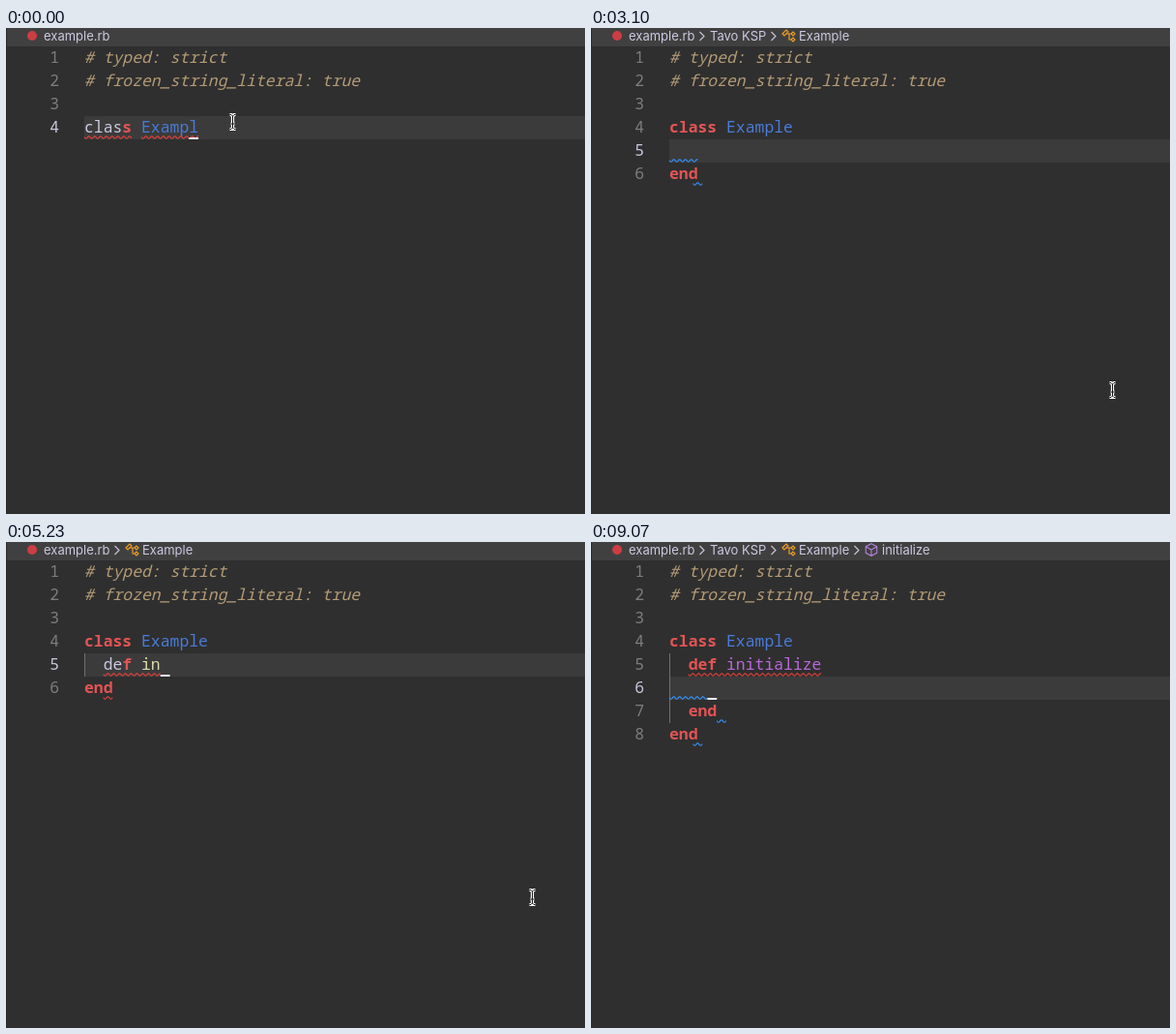
Animation of 599x502 px, one loop 9090 ms. Source, as an HTML page with a canvas:

```html
<!DOCTYPE html>
<html lang="en">
<head>
<meta charset="utf-8">
<title>Editor</title>
<style>
html, body { margin: 0; width: 100%; height: 100%; overflow: hidden; background: #2f2f2f; }
canvas { display: block; }
</style>
</head>
<body>
<canvas id="stage" width="599" height="502"></canvas>
<script>
const ctx = document.getElementById('stage').getContext('2d');
const LOOP = 9090, LEFT = 81, CHAR = 9.84, ROW = 24;
const MONO = '"Noto Sans Mono", monospace', UI = 'Inter, sans-serif';
const RED = '#e8413c', BLUE = '#3794ff', FG = '#cdc8e0';
const INK = { p: FG, k: '#e25455', t: '#4a7bd8', m: '#dcdcaa', f: '#b868d8', c: '#b39b76' };
const COMMENTS = ['~c# typed: strict', '~c# frozen_string_literal: true', ''];
const PLAIN = '~pclas~ks ~tExampl', CLASS = '~kclass ~tExample';

const ITEMS = [
  ['def', '(marlop) New method'], ['defined?'], ['do'],
  ['define_method'], ['define_method'], ['deprecate_constant'],
  ['define_singleton_method'], ['define_singleton_method'],
  ['display'], ['dup'],
  ['def', 'Define method'], ['def', 'Define singleton method']
];

const rowTop = row => 19 + (row - 1) * ROW;
const colX = col => LEFT + col * CHAR;
const defBody = word => [CLASS, '  ~pde~kf ~m' + word, '~kend'];
const defWaves = end => [[5, 2, end, RED], [6, 2, 3, RED]];

// Typing after "def " on line 5
function typed(word) {
  const col = 6 + word.length;
  return { body: defBody(word), col, waves: defWaves(col) };
}

// [time, changes to the editor state]
const STEPS = [
  [0, { body: [PLAIN], row: 4, col: 11, crumbs: '', popup: null, bulb: false, guide: 0,
        waves: [[4, 0, 5, RED], [4, 6, 12, RED]] }],
  [60, { col: 12 }],
  [120, { popup: { row: 4, col: 12, word: 'Exampl', items: [['Example']] } }],
  [240, { body: [PLAIN + 'e'], col: 13 }],
  [300, { popup: null }],
  [360, { waves: [[4, 0, 5, RED], [4, 6, 13, RED]] }],
  [780, { crumbs: 'C' }],
  [1070, { body: [PLAIN + 'e', '', '~kend'], row: 5, col: 2 }],
  [1130, { waves: [[4, 0, 5, RED], [4, 6, 13, RED], [5, 0, 3, BLUE], [6, 2.5, 3.5, BLUE]] }],
  [1310, { crumbs: 'LC' }],
  [1370, { body: [CLASS, '', '~kend'] }],
  [1430, { waves: [[5, 0, 3, BLUE], [6, 2.5, 3.5, BLUE]] }],
  [4230, { body: [CLASS, '  ~pd', '~kend'], col: 3, guide: 1, popup: suggest('d'),
           waves: [[5, 2, 3, RED], [5, 3, 4, BLUE], [6, 2.5, 3.5, BLUE]] }],
  [4350, { body: [CLASS, '  ~pde', '~kend'], col: 4, popup: suggest('de') }],
  [4470, { body: [CLASS, '  ~pde~kf', '~kend'], col: 5, popup: suggest('def') }],
  [4570, { popup: null, waves: defWaves(5) }],
  [4870, { crumbs: 'C' }],
  [5110, typed('i')],
  [5170, typed('in')],
  [5350, typed('int')],
  [5470, typed('inti')],
  [5710, { crumbs: 'LC' }],
  [5770, { bulb: true }],
  [5890, { body: defBody('int'), col: 9 }],
  [6010, { body: defBody('in'), col: 8 }],
  [6130, { body: defBody('ini'), col: 9 }],
  [6190, { bulb: false }],
  [6250, typed('init')],
  [6370, typed('initi')],
  [6480, typed('initia')],
  [6540, typed('initial')],
  [6660, typed('initiali')],
  [6720, typed('initializ')],
  [6780, typed('initialize')],
  [7010, { body: [CLASS, '  ~pde~kf ~minitialize', '', '  ~kend', '~kend'], row: 6, col: 4,
           guide: 3, waves: [[5, 2, 16, RED], [8, 2, 3, RED]] }],
  [7190, { crumbs: 'LCM' }],
  [7310, { body: [CLASS, '  ~kdef ~finitialize', '', '  ~kend', '~kend'] }],
  [7490, { waves: [[5, 2, 16, RED], [6, 0, 4, BLUE], [7, 5, 6, BLUE], [8, 2.5, 3.5, BLUE]] }]
];

// [fade-out start, fade-in start, whether the caret returns at once]
const BLINKS = [[780, 1070, true], [1730, 2320], [2730, 3330], [3690, 4230, true],
                [7720, 8310], [8710, 9070, true]];

const MOUSE = [[235, 97], [330, 8], [480, 460], [545, 367]];

function suggest(word) {
  return { row: 5, col: 3, word, items: ITEMS.filter(([name]) => name.startsWith(word)) };
}

function stateAt(t) {
  const s = {};
  for (const [start, change] of STEPS) {
    if (start > t) break;
    if (change.col !== undefined) {
      s.fromCol = change.row ? change.col : s.col;
      s.movedAt = start;
    }
    Object.assign(s, change);
  }
  return s;
}

function rect(x, y, w, h, color) {
  ctx.fillStyle = color;
  ctx.fillRect(x, y, w, h);
}

function text(str, x, y, color, font, align = 'left') {
  ctx.font = font;
  ctx.fillStyle = color;
  ctx.textAlign = align;
  ctx.fillText(str, x, y);
}

function stroke(d, x, y, color, width = 1) {
  ctx.save();
  ctx.translate(x, y);
  ctx.strokeStyle = color;
  ctx.lineWidth = width;
  ctx.stroke(new Path2D(d));
  ctx.restore();
}

function dot(x, y, r, color) {
  ctx.fillStyle = color;
  ctx.beginPath();
  ctx.arc(x, y, r, 0, 7);
  ctx.fill();
}

function codeLine(line, row) {
  let col = 0;
  line.split(/(?=~[a-z])/).forEach(part => {
    const kind = part[0] === '~' ? part[1] : 'p';
    const str = part[0] === '~' ? part.slice(2) : part;
    const style = kind === 'k' ? 'bold ' : kind === 'c' ? 'italic ' : '';
    text(str, colX(col), rowTop(row) + 17, INK[kind], `${style}16.4px ${MONO}`);
    col += str.length;
  });
}

function wave([row, from, to, color]) {
  const x0 = colX(from), x1 = colX(to), y = rowTop(row) + 22;
  ctx.beginPath();
  for (let x = x0; x <= x1; x += 0.5) ctx.lineTo(x, y + 1.2 * Math.cos((x - x0 - 1.75) * Math.PI / 3));
  ctx.strokeStyle = color;
  ctx.lineWidth = 1.1;
  ctx.stroke();
}

const cube = (x, y) => stroke('M0-6.3L5.7-3.3V3.3L0 6.3L-5.7 3.3V-3.3ZM-5.7-3.3L0 0L5.7-3.3M0 0V6.3', x, y, '#b180d7', 1.1);

function snippet(x, y) {
  stroke('M-5.5 6V-5.5H6.5V6', x, y, '#d8d8d8');
  for (let i = -6; i <= 6; i += 2) rect(x + i, y + 6, 1, 1, '#d8d8d8');
}

const classIcon = (x, y) =>
  stroke('M-6-2L-2-6L0-4L-4 0ZM-2-2H3M1-2V4H3M3-2L5-4L7-2L5 0ZM3 4L5 2L7 4L5 6Z', x, y, '#ee9d28', 1.2);

function crumbs(list) {
  const font = '13px ' + UI;
  rect(0, 0, 599, 19, '#404040');
  dot(27, 8, 5, '#cc3e44');
  text('example.rb', 39, 13, FG, font);
  let x = 111;
  for (const kind of list) {
    stroke('M1.5-4.5L6 0L1.5 4.5', x, 8.5, '#c4c0d4', 1.2);
    x += 12;
    if (kind === 'L') {
      text('Tavo KSP', x, 13, FG, font);
      x += 62;
    } else {
      (kind === 'C' ? classIcon : cube)(x + 7, 8);
      text(kind === 'C' ? 'Example' : 'initialize', x + 18, 13, FG, font);
      x += 74;
    }
  }
}

function popup({ row, col, word, items }) {
  const x = Math.round(colX(col)), y = rowTop(row) + ROW, h = items.length * ROW + 4;
  rect(x, y, 432, h, '#454545');
  rect(x + 1, y + 1, 430, h - 2, '#252526');
  rect(x + 1, y + 1, 430, ROW, '#04395e');
  items.forEach(([name, detail], i) => {
    const mid = y + 13 + i * ROW, base = y + 18 + i * ROW, size = `16.4px ${MONO}`;
    const keyword = detail || ['defined?', 'do', 'Example'].includes(name);
    (keyword ? snippet : cube)(x + 11, mid);
    text(word, x + 23, base, '#2aaaff', 'bold ' + size);
    text(name.slice(word.length), x + 23 + word.length * CHAR, base, FG, size);
    if (detail) text(detail, x + 421, base - 1, i ? '#8f8c99' : '#b9bccb', `13.9px ${MONO}`, 'right');
  });
}

function bulb() {
  dot(89.5, 97, 5, '#ffcc00');
  rect(87, 99, 5, 4, '#ffcc00');
  rect(87, 103, 5, 2, '#d8d8d8');
}

function caretAlpha(t) {
  let alpha = 1;
  for (const [out, back, sudden] of BLINKS) {
    const steps = from => (Math.floor((t - from) / 60) + 1) / 3;
    if (t >= back) alpha = sudden ? 1 : Math.min(1, steps(back));
    else if (t >= out) alpha = Math.max(0, 1 - steps(out));
  }
  return alpha;
}

function caret(s, t) {
  const k = Math.min(1, 0.7 + (t - s.movedAt) / 200);
  const col = s.fromCol === undefined ? s.col : s.fromCol + (s.col - s.fromCol) * k;
  ctx.globalAlpha = caretAlpha(t);
  rect(colX(col), rowTop(s.row) + 22, CHAR, 2, '#f0eeff');
  ctx.globalAlpha = 1;
}

function mousePos(t) {
  if (t >= 8080) return [556, 363];
  const p = Math.min(0.9999, Math.max(0, (t - 2320) / 830)) * 3;
  const i = Math.floor(p), k = (1 - Math.cos((p - i) * Math.PI)) / 2;
  return MOUSE[i].map((v, n) => Math.round(v + (MOUSE[i + 1][n] - v) * k));
}

function mouse(t) {
  if (t >= 8130) return;
  const [x, y] = mousePos(t);
  const beam = 'M-3-7.5H-1.5L0-6L1.5-7.5H3M0-6V6M-3 7.5H-1.5L0 6L1.5 7.5H3M-2 2H2';
  stroke(beam, x - 0.5, y, '#fff', 3.2);
  stroke(beam, x - 0.5, y, '#111', 1);
}

function draw(t) {
  const s = stateAt(t);
  const lines = COMMENTS.concat(s.body);
  rect(0, 0, 599, 502, '#2f2f2f');
  rect(LEFT, rowTop(s.row), 599 - LEFT, ROW, '#3b3b3b');
  crumbs(s.crumbs);
  rect(0, 0, 1, 502, '#282828');
  if (s.guide) rect(LEFT, rowTop(5), 1, s.guide * ROW, '#707070');
  lines.forEach((line, i) => {
    const row = i + 1;
    text(row, 55, rowTop(row) + 17, row === s.row ? '#c9c6dd' : '#7d7d7d', `16.4px ${MONO}`, 'right');
    codeLine(line, row);
  });
  s.waves.forEach(wave);
  caret(s, t);
  if (s.bulb) bulb();
  if (s.popup) popup(s.popup);
  mouse(t);
}

const begin = performance.now();
function frame() {
  draw((performance.now() - begin) % LOOP);
  requestAnimationFrame(frame);
}
frame();
</script>
</body>
</html>
```
